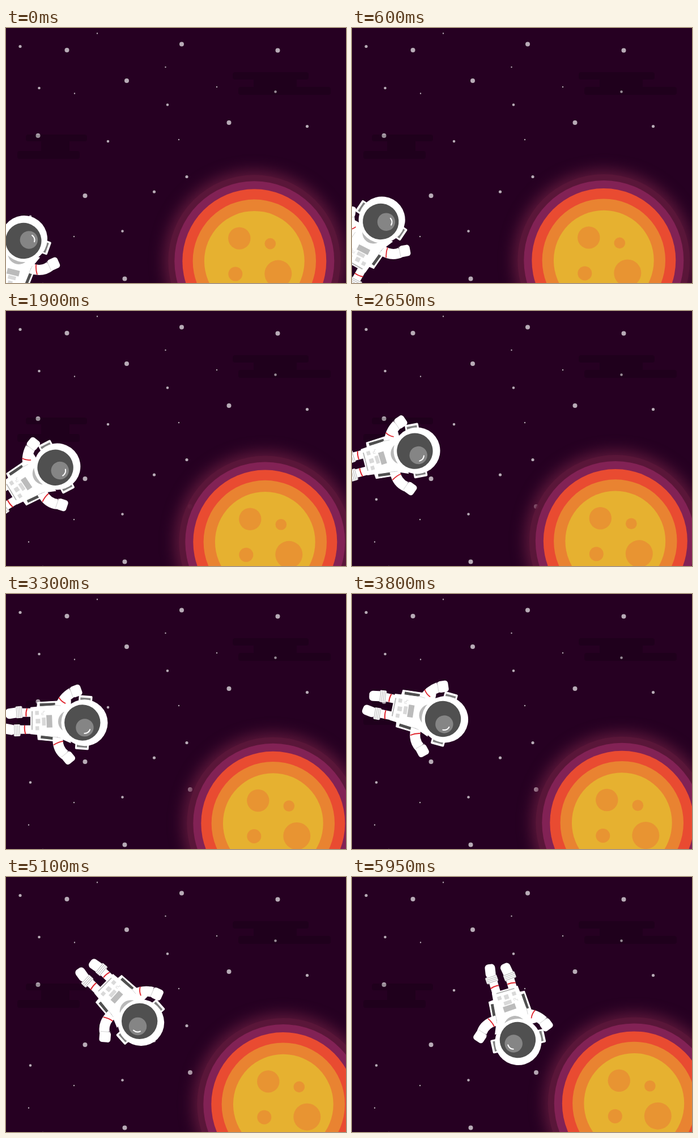
An HTML page for the animation above (6 s loop, 600 by 450 pixels).

```html
<!DOCTYPE html>
<html lang="en">
<head>
<meta charset="utf-8">
<title>Drifting astronaut</title>
<style>
  html, body { margin: 0; width: 100%; height: 100%; overflow: hidden; background: #260022; }
  svg { display: block; width: 100vw; height: 100vh; }
</style>
</head>
<body>
<svg viewBox="0 0 600 450">
  <defs>
    <filter id="blur" x="-30%" y="-30%" width="160%" height="160%" color-interpolation-filters="sRGB">
      <feGaussianBlur stdDeviation="12"/>
    </filter>
    <g id="cuff">
      <rect x="-10.5" y="-6" width="21" height="12" rx="2" fill="#fff"/>
      <path d="M-10-4.5H10M-10-1.5H10M-10 1.5H10M-10 4.5H10" stroke="#b4b4b4"/>
    </g>
    <g id="glove">
      <rect x="-10" y="-10" width="20" height="19" rx="5" fill="#fff"/>
      <path d="M-9 8.5H9" stroke="#ccc" stroke-width=".8"/>
    </g>
    <rect id="boot" x="-9" y="-12" width="18" height="24" rx="6.5" fill="#fff"/>
    <g id="ear">
      <rect x="-6" y="-12" width="12" height="24" rx="2" fill="#fff"/>
      <rect x="-2.2" y="-9" width="4.4" height="18" fill="#808080"/>
    </g>
  </defs>

  <rect width="600" height="450" fill="#260022"/>

  <!-- Stars: zero-length strokes with round caps, one path per size -->
  <g stroke="#fff" stroke-linecap="round" opacity=".67">
    <path stroke-width="2.4" d="M161 9.5h0M281.5 69h0M121 115.5h0M372 104h0M305 197h0M120 368h0M40 407.5h0"/>
    <path stroke-width="4.6" d="M58.5 106h0M475.5 112.5h0M285 135.5h0M180 200h0M43 332.5h0M205.5 358.5h0M65 452h0"/>
    <path stroke-width="5.2" d="M25 32.5h0M531.5 173.5h0M319 262.5h0M261.5 289h0"/>
    <path stroke-width="8" d="M107.5 39h0M310 28.5h0M479.5 39.5h0M213 93h0M393.5 167h0M56.5 190h0M139.5 296h0M209.5 442.5h0M325 345h0"/>
  </g>

  <!-- Clouds -->
  <g opacity=".17">
    <rect x="400" y="78" width="134" height="13" rx="4"/>
    <rect x="437" y="91" width="76" height="13"/>
    <rect x="410" y="104" width="163" height="14" rx="4"/>
    <rect x="35" y="188" width="108" height="12" rx="4"/>
    <rect x="62" y="200" width="50" height="17"/>
    <rect x="20" y="217" width="110" height="14" rx="4"/>
  </g>

  <g id="planet">
    <circle r="160" fill="#5c173a" filter="url(#blur)"/>
    <circle r="152" fill="#5c173a" opacity=".8"/>
    <circle r="141" fill="#822255"/>
    <circle r="127" fill="#e94b31"/>
    <circle r="108.7" fill="#e98331"/>
    <circle r="88.4" fill="#e6b130"/>
    <g fill="#e89432">
      <circle cx="-26.5" cy="-40.2" r="19.7"/>
      <circle cx="28" cy="-30.7" r="9.8"/>
      <circle cx="-33.5" cy="22.8" r="12.5"/>
      <circle cx="42" cy="22.3" r="24"/>
    </g>
  </g>

  <!-- Drawn upright, with the helmet centre at 0,0 -->
  <g id="astronaut" fill="none">
    <!-- legs -->
    <path d="M-17.5 92V117M12.5 92V119" stroke="#fff" stroke-width="15"/>
    <use href="#boot" transform="translate(-16.3 127.5) rotate(-9)"/>
    <use href="#boot" transform="translate(12 134) rotate(10)"/>
    <path d="M-25 101.5Q-18 104-10.5 103M5 105.5Q12 106.5 20.5 104" stroke="#e0242c" stroke-width="2"/>
    <use href="#cuff" transform="translate(-18.2 115.5) rotate(-5)"/>
    <use href="#cuff" transform="translate(13.8 119) rotate(-2)"/>

    <!-- backpack -->
    <path d="M20 83L30 82 33 49H20zM-26 84L-36 83 -38 48H-26z" fill="#fff" stroke="#fff" stroke-linejoin="round"/>
    <path d="M25.4 77L27.8 55M-31.5 79L-32.5 52" stroke="#505050" stroke-width="5"/>

    <!-- arms -->
    <path d="M-28 43Q-44 38-53 23M26 47Q47 48 57 34" stroke="#fff" stroke-width="18"/>
    <use href="#glove" transform="translate(-56 15.5) rotate(-20)"/>
    <use href="#glove" transform="translate(61.8 28.2) rotate(50)"/>

    <!-- torso -->
    <path d="M-27 95.5H20.5L25.5 48 36 24H-41L-31 48z" fill="#fff"/>
    <path d="M-44.5 45.5Q-37 41-34 33.5M39.5 54.5Q34 46 32.8 37.5" stroke="#e0242c" stroke-width="1.8"/>
    <path d="M-31 54L-30 42M25 54L27 42" stroke="#ccc" stroke-width=".8"/>
    <path d="M-20 92.5H13" stroke="#b4b4b4" stroke-width="1.8"/>
    <g transform="rotate(-2.5 -2 70)">
      <rect x="-13" y="57" width="22" height="10" fill="#bbb"/>
      <path d="M-21 80h7v6.5h-7zM-9 68.5h14v6.5h-14zM-7 78h8v8h-8zM6 80.5h7v6.5h-7z" fill="#d9d9d9"/>
      <path d="M-20 69v3h3v3h3v-4" stroke="#ddd"/>
    </g>

    <!-- head -->
    <circle cx="-2" cy="27" r="19.5" fill="#b9b9b9"/>
    <g transform="rotate(4)">
      <use href="#ear" x="-42" y="1.3"/>
      <use href="#ear" x="41.5" y="1.3"/>
    </g>
    <circle r="41" fill="#fff"/>
    <circle cx="-.2" cy="3.7" r="31.7" fill="#505050"/>
    <circle cx="8.6" cy="-.5" r="15.7" fill="#858585"/>
    <path d="M11.8-9.8Q18.5-7.5 18.8 0" stroke="#fff" stroke-width="2" stroke-linecap="round"/>
  </g>
</svg>

<script>
  const LOOP = 6000, STEP = 50;
  const planet = document.getElementById('planet');
  const astronaut = document.getElementById('astronaut');

  // Flight path of the body: seconds, x, y
  const path = [
    [0, 15.5, 429.7], [2.65, 56.4, 261.3], [3.3, 78.5, 227],
    [4.35, 141.2, 201.6], [5.1, 195.3, 215.1], [5.95, 276.4, 233.5]
  ];

  const slope = (a, b, axis) => (b[axis] - a[axis]) / (b[0] - a[0]);

  // Speed at a point: the slopes on both sides, weighted towards the nearer neighbour
  function speed(i, axis) {
    const p = path[i], a = path[i - 1] || p, b = path[i + 1] || p;
    if (a === p) return slope(p, b, axis);
    if (b === p) return slope(a, p, axis);
    const w = (p[0] - a[0]) / (b[0] - a[0]);
    return slope(a, p, axis) * (1 - w) + slope(p, b, axis) * w;
  }

  // Smooth cubic curve through the path points
  function along(t, axis) {
    const i = Math.max(0, path.findLastIndex((p, k) => k < path.length - 1 && p[0] <= t));
    const a = path[i], b = path[i + 1], span = b[0] - a[0];
    const u = (t - a[0]) / span, v = 1 - u, s = slope(a, b, axis);
    return a[axis] + s * span * u
      + span * u * v * ((speed(i, axis) - s) * v - (speed(i + 1, axis) - s) * u);
  }

  // Steady spin that speeds up near the end
  const spin = t => 16 + 22.5 * t + 4.5 * Math.max(0, t - 4.2) ** 2;

  function draw(now) {
    const t = Math.floor((now % LOOP) / STEP) * STEP / 1000;
    planet.setAttribute('transform', `translate(${438.3 + 10 * t} ${411.3 - 2 * t})`);
    astronaut.setAttribute('transform',
      `translate(${along(t, 1)} ${along(t, 2)}) rotate(${spin(t)}) translate(0 -60)`);
  }

  const start = performance.now();
  function tick() {
    draw(performance.now() - start);
    requestAnimationFrame(tick);
  }
  tick();
</script>
</body>
</html>
```
